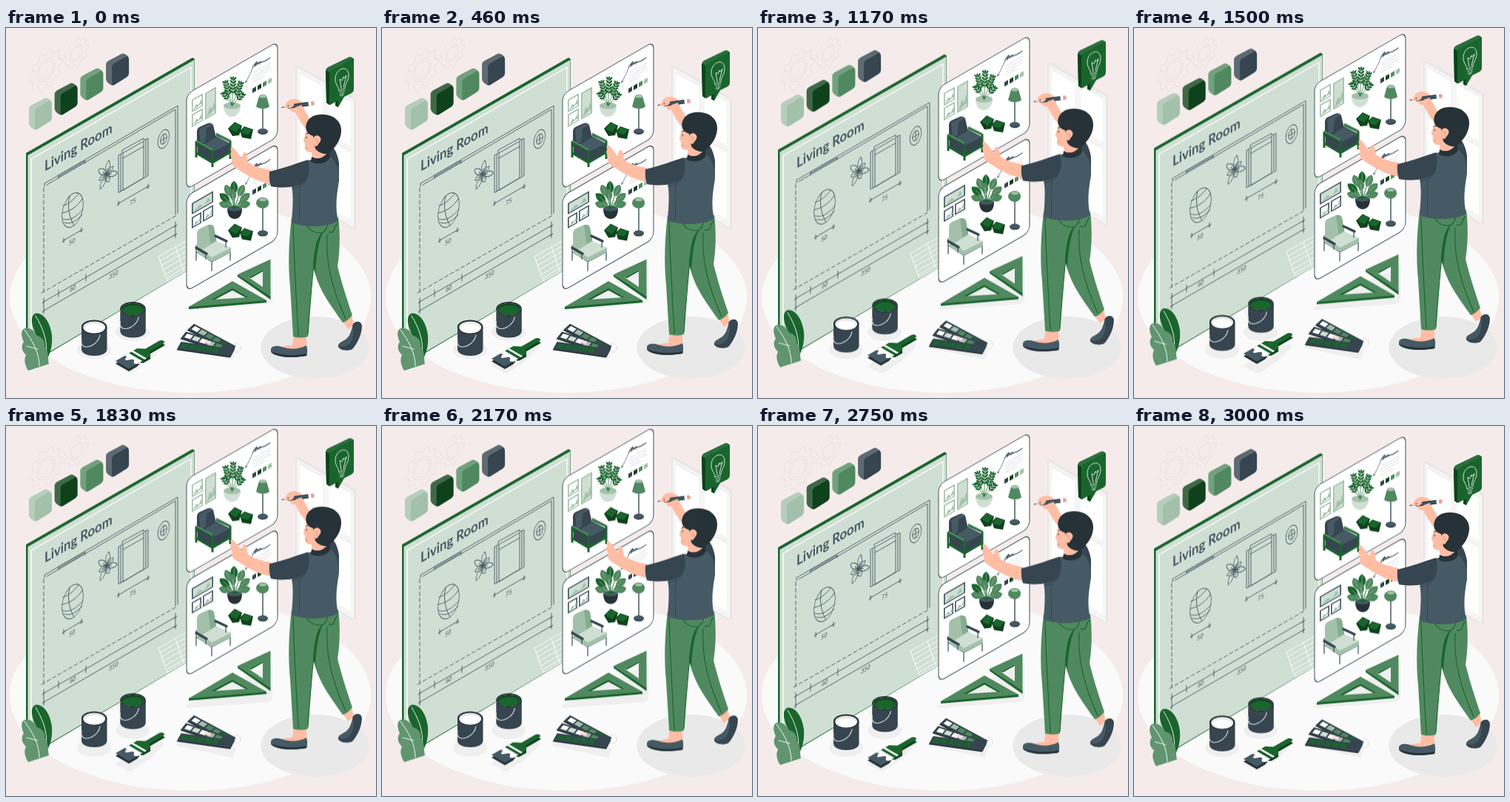
An HTML page that plays this animation: 500x500 px, repeating every 3040 ms.

```html
<!DOCTYPE html>
<html lang="en">
<head>
<meta charset="utf-8">
<title>Living room design</title>
<style>
html, body { margin: 0; width: 100%; height: 100%; overflow: hidden; background: #f5ebeb; }
svg { display: block; width: 100vw; height: 100vh; stroke-width: .9; }
.bob, .late { --a: -10px; animation: bob 3040ms linear infinite; }
.late { animation-name: late; }
#cards { --a: -19.7px; }
#bubble { --a: -29px; }
@keyframes bob {
  0%, 98.684%, 100% { transform: translateY(0); }
  49.342% { transform: translateY(var(--a)); }
}
/* same 3 s bob, started half a second later and cut by the loop */
@keyframes late {
  0%, 16.447% { transform: translateY(0); }
  65.789% { transform: translateY(var(--a)); }
  100% { transform: translateY(calc(var(--a) * .3067)); }
}
.w { fill: #fff } .s { fill: #455a64 } .k { fill: #36454f } .n { fill: #263238 }
.g { fill: #50895f } .d { fill: #1a652e } .x { fill: #0f421c } .l { fill: #a3c1aa }
.p { fill: #d0dfd4 } .f { fill: #ffbda4 } .sh { fill: #efefef }
.o { fill: none; stroke: #455a64; stroke-linejoin: round; stroke-linecap: round }
.wl { stroke: #fff } .dl { stroke: #1a652e }
text { fill: #455a64; font-family: Lato, Arial, sans-serif }
</style>
</head>
<body>
<svg viewBox="0 0 500 500">
  <ellipse cx="249" cy="364" rx="244" ry="129" fill="#fafafa"/>
  <g id="gears" fill="none" stroke="#e9dfdf"></g>
  <ellipse cx="417.5" cy="432" rx="73" ry="42" fill="#e9e9e9"/>
  <g class="sh">
    <ellipse cx="119" cy="435" rx="23" ry="12"/>
    <ellipse cx="171" cy="411" rx="23" ry="12"/>
    <path d="M147 457L176 438 211 426 214 430 194 450 168 467Z"/>
    <path d="M241 379L306 346 360 369 354 373 246 381Z"/>
    <path d="M314 342L360 322V369Z"/>
    <path d="M230 432L250 407 311 436 306 448Z"/>
  </g>

  <g class="late">
    <path d="M391 52L394 50 473 95V271L470 272 391 226Z" fill="#e8e6e6"/>
    <path d="M393 53L470 97V270L393 225Z" fill="#f5f5f5"/>
    <path class="w" d="M397 60L428 78V137L397 119ZM436 82L466 99V159L436 142ZM397 127L428 145V237L397 219ZM436 150L466 167V259L436 242Z"/>
    <path d="M397 60L428 78M436 82L466 99M397 127L428 145M436 150L466 167" stroke="#e4e4e4" fill="none"/>
  </g>

  <g id="board" class="late">
    <path class="d" d="M27 169L252 40 255 42V322L30 456 27 454Z"/>
    <path class="p" d="M29.500 172L254.500 43V322L29.500 455Z"/>
    <path class="o wl" stroke-width="1.300" d="M34 449V177L250 53V322"/>
    <text transform="matrix(.866 -.5 0 1 52 194)" font-size="19.300" font-weight="700">Living Room</text>
    <path class="o" d="M52 214V210L232 105V250M55 212L229 110V252M71 203V199L107 179V183M71 201L107 181"/>
    <path class="o" stroke-dasharray="5 3.500" d="M51 216V357M48 358L229 254"/>
    <path class="o" d="M51 370L229 267M51 382L229 279M51 365V386M71 354V363M108 333V342M229 262V283M49 372l4-3M49 384l4-3M227 269l4-3M227 281l4-3"/>
    <g class="o">
      <path d="M152 222V172L157 169V165L186 149V152L192 149V199ZM158 219V169L186 153V202ZM158 176L186 160M155 221V171M189 200V151M152 237L192 214M152 234V240M192 211V217M78 287L102 273M78 284V290M102 270V276M150 239l4-3M190 216l4-3M76 289l4-3M100 275l4-3"/>
      <ellipse transform="matrix(.866 -.5 0 1 90 246)" rx="16.500" ry="22"/>
      <path d="M77 240C86 238 93 230 98 224M76 250C88 248 97 240 103 231M77 258C86 262 96 254 104 245M79 263C87 266 95 261 103 252M86 227C82 240 86 258 92 267"/>
      <ellipse transform="matrix(.866 -.5 0 1 213 150)" rx="9" ry="12"/>
      <ellipse transform="matrix(.866 -.5 0 1 213 150)" rx="5" ry="6.500"/>
      <path d="M213 144V156M208.500 152.500L217.500 147.500"/>
      <g id="sketch" transform="matrix(.866 -.5 0 1 136 198)"></g>
    </g>
    <g font-size="8.500" font-style="italic">
      <text transform="matrix(.866 -.5 0 1 86 357)">60</text>
      <text transform="matrix(.866 -.5 0 1 139 340)">350</text>
      <text transform="matrix(.866 -.5 0 1 167 240)">75</text>
      <text transform="matrix(.866 -.5 0 1 85 294)">50</text>
    </g>
    <path class="o wl" d="M206 309L243 288M206 309L218 342 243 328M208 315L243 295M210 321L243 302M212 327L243 309M215 333L243 317M217 338L243 323M229 296L240 328"/>
    <g id="cubes"></g>
    <path class="d" d="M48 451C52 435 45 425 39 411C34 400 33 389 39 386C50 383 60 398 62 415C63 430 60 440 54 450Z"/>
    <path class="o wl" d="M40 389C51 407 57 425 54 446"/>
    <path fill="#609570" d="M30 463C25 455 24 448 27 442C21 436 20 430 24 424C20 416 20 408 25 406C34 404 38 410 42 416C50 418 53 424 52 430C58 436 56 445 58 454Z"/>
    <path class="o wl" d="M25 408C37 424 45 440 45 457M28 430L43 434"/>
  </g>

  <g class="late">
    <g id="can">
      <path class="k" d="M102 404V434C102 446 136.500 446 136.500 434V404Z"/>
      <ellipse class="n" cx="119.200" cy="404" rx="17.300" ry="9.500"/>
      <ellipse cx="119.200" cy="404.500" rx="15" ry="8" fill="#e8e8e8"/>
      <ellipse class="w" cx="119.200" cy="406" rx="13" ry="6.200"/>
      <path class="o" style="stroke:#dfe3e4" stroke-width="1.200" d="M102 421C100 431 108 433 116 429C124 425 126 420 127 415"/>
    </g>
    <use href="#can" x="52.300" y="-24.500"/>
    <ellipse class="x" cx="171.500" cy="380" rx="15" ry="8"/>
    <ellipse class="d" cx="171.500" cy="381" rx="13.500" ry="6.500"/>
    <path class="o" style="stroke:#dfe3e4" d="M155 382C149 386 149 393 154 397"/>
  </g>

  <g class="bob">
    <g class="x" transform="matrix(.86 -.5 .86 .5 148 453.500)">
      <path class="n" d="M0 0H18V21H0Z"/><path d="M21 0H34L40 7H64V14H40L34 21H21Z"/>
    </g>
    <g transform="matrix(.86 -.5 .86 .5 148 450)">
      <path class="s" d="M0 0H20V21H0Z"/>
      <path class="w" d="M22 0V21H13Q9 18 14 15T12 9T15 3L14 0Z"/>
      <path class="d" d="M21 0H34L40 7H60Q65 7 65 10.500T60 14H40L34 21H21Z"/>
      <path class="w" d="M25 0H28V21H25Z"/>
    </g>
    <path class="w" d="M178 456L185 452V455L178 459Z"/>
  </g>

  <g id="fan" class="late"><ellipse cx="312" cy="432" rx="5" ry="6" fill="none" stroke="#dedede"/></g>

  <g class="late">
    <path class="d" fill-rule="evenodd" d="M247 377V380L352 371V368L306 344ZM277 370L306 354 327 366Z"/>
    <path class="g" fill-rule="evenodd" d="M247 377L306 342 352 368ZM278 367L306 352 327 364Z"/>
    <path class="d" d="M278 367L306 352 327 364 324 364.300 306 354.500 282 367Z"/>
    <path class="d" d="M313 333L357.500 362V367L313 336Z"/>
    <path class="g" fill-rule="evenodd" d="M313 333L357.500 312.500V363ZM328 337L347 327V350Z"/>
    <path class="d" d="M328 337L347 327V329L331 338Z"/>
  </g>

  <g id="cards" class="late">
    <g id="card">
      <rect class="w" transform="matrix(.866 -.5 0 1 244 89.500)" width="142" height="128.500" rx="9" stroke="#455a64" stroke-width="1.200"/>
      <path class="o" stroke-width="1.100" d="M333 54C336 48 340 43 339 47L336 52C339 49 341 46 341 49C343 48 344 45 345 47C347 47 347 44 349 45C350 46 352 42 353 43L357 40M335 50L345 45"/>
      <path d="M334 61L358 47M334 65L358 51M334 69L358 55M334 73L350 64" stroke="#cfd6d9" fill="none" stroke-width=".8"/>
      <path class="o" stroke-width=".7" d="M333 55C330 62 327 68 324 73M324 71V74L326 72"/>
      <path class="k" d="M333 82l5-3v6l-5 3z"/><path class="x" d="M340 78l5-3v6l-5 3z"/>
      <path class="g" d="M347 74l5-3v6l-5 3z"/><path class="l" d="M354 70l5-3v6l-5 3z"/>
      <path class="x" d="M300 136L309 127 319 132 315 145 306 146Z"/>
      <path class="d" d="M302 136L309 128 318 132 311 141Z"/>
      <path class="x" d="M316 139L322 133 334 137 331 150 319 148Z"/>
      <path class="d" d="M321 134L333 137 327 144 317 142Z"/>
      <path class="o" stroke-width="1.500" d="M347 106V140"/>
      <ellipse class="k" cx="347" cy="140" rx="7" ry="4"/><ellipse class="s" cx="347" cy="139" rx="6.500" ry="3"/>
    </g>
    <use href="#card" y="137.600"/>
    <g id="frames"></g>
    <path class="g" d="M342 92L338 106C341 110 353 110 356 106L352 92Z"/><ellipse class="l" cx="347" cy="92" rx="5" ry="2.500"/>
    <path class="g" d="M338 237C338 232 342 229 347 229S355 232 355 237C354 246 340 246 338 237Z"/><ellipse class="l" cx="347" cy="232" rx="5" ry="2"/>
    <path class="p" d="M294 105C294 114 299 120 305 120S317 114 317 105Z"/><ellipse cx="305.500" cy="105" rx="11.500" ry="4.500" class="l"/>
    <g id="fern"></g>
    <path class="n" d="M299 244C299 253 303 258 309 258S319 253 319 244Z"/><ellipse cx="309" cy="244" rx="10" ry="3.500" class="s"/>
    <g id="ficus"></g>

    <g stroke-linejoin="round">
      <path class="k" d="M258 160V139Q258 136 261 134L272 129Q277 127 280 131L285 153 278 168Z"/>
      <path class="s" d="M261 137L273 130Q277 128 280 131L271 136 269 161 263 158Z"/>
      <path class="k" d="M259 159L284 146 303 156V167L279 181 259 170Z"/>
      <path class="s" d="M267 158L284 147 303 156 279 168Z"/>
      <path d="M284 144L303 153V177M257 175V154L279 166V188M257 169L279 182 303 168" fill="none" stroke="#1a652e" stroke-width="3"/>
      <path d="M284 142.500L303 152M257 152.500L279 164.500" fill="none" stroke="#50895f" stroke-width="2"/>
    </g>
    <g>
      <path class="o" stroke-width="1.300" d="M257 294V314M278 312V328M303 300V314M258 303L278 316 303 303"/>
      <path class="l" d="M258 300V278Q258 273 262 271L273 266Q279 265 281 269L285 291 274 304Z"/>
      <path class="g" opacity=".35" d="M273 266Q279 265 281 269L285 291 277 297Z"/>
      <path class="l" d="M259 301L284 288 304 297V303L278 316 259 305Z"/>
      <path class="p" d="M265 300L284 288 304 297 278 310Z"/>
      <path d="M283 281L298 288M257 297L271 305" fill="none" stroke="#36454f" stroke-width="3.500" stroke-linecap="round"/>
      <path class="o" stroke-width="1.300" d="M297 289V296M270 305V312"/>
    </g>
  </g>

  <g class="bob">
    <path class="f" d="M378 104C380 97 388 94 395 97C400 99 402 103 402 108L412 126 409 141C401 132 395 122 391 114C386 114 383 111 384 108Z"/>
    <path class="f" d="M455 396L467 387 470 401 462 407ZM389 414L406 414 406 432 386 434Z"/>
    <path class="k" d="M469 400C473 395 480 396 481 402C481 415 474 427 468 434C462 437 452 436 449 431C448 426 454 424 459 421C466 416 467 408 469 400Z"/>
    <path class="s" d="M469 400C471 410 470 424 461 429Q453 433 449 429C450 425 455 424 459 421C466 416 467 408 469 400Z"/>
    <path class="f" d="M371 431Q388 426 406 430L400 437 378 437Z"/>
    <path class="s" d="M358 434C359 429 367 429 373 431C384 435 396 434 406 429C408 435 407 440 406 443C390 446 365 446 358 438Z"/>
    <path class="n" d="M358 437C372 443 392 443 407 440L406 443C390 446 364 446 358 437Z"/>
    <path class="g" d="M402 258L449 256C452 280 451 305 448 322C455 350 462 370 468 388Q462 396 455 398C440 376 420 352 415 320Z"/>
    <path class="g" d="M386 256C382 290 381 320 384 350L388 417Q398 420 408 417C411 380 412 345 418 305L430 258Z"/>
    <path class="o dl" d="M428 276C420 284 418 296 416 318C413 350 410 385 408 414M388 264C389 310 392 360 395 416M448 264C441 270 447 277 436 276M405 265C409 273 418 279 429 276C435 270 435 264 434 262M434 280C431 320 444 360 459 393" stroke-width="1.100"/>
    <path class="d" d="M428 276C420 284 417 296 415 322L418 332C419 312 421 292 428 276Z"/>
    <path class="k" d="M434 157C442 158 447 166 450 182V205L434 180Z"/>
    <path class="s" d="M404 180L436 172C446 179 451 191 450 207C446 230 445 244 449 261C434 269 406 271 386 263C387 246 389 230 386 213L400 195Z"/>
    <path class="o" style="stroke:#36454f" d="M398 212C394 230 398 246 396 263M405 207C402 212 394 216 387 217"/>
    <path class="f" d="M358 192C345 190 333 186 327 181C325 175 326 170 323 168C319 167 320 174 318 176C314 170 310 164 306 161C303 161 303 164 305 168C302 168 303 173 306 178C304 182 306 187 312 190C322 197 340 208 358 211Z"/>
    <path class="k" d="M408 178C392 183 374 190 356 194Q355 205 358 214C374 217 395 216 406 206Q412 194 408 178Z"/>
    <path class="f" d="M408 131L402 152Q401 155 404 155L404 163Q405 168 413 168L414 175Q424 179 435 172L434 135Z"/>
    <path class="n" d="M413 174Q425 181 436 167L438 174C436 182 423 186 412 181Z"/>
    <path class="n" d="M415 146C409 144 403 139 406 129C410 119 420 116 430 117C445 118 454 128 453 140C452 153 444 163 435 170C427 171 421 167 418 163Z"/>
    <path class="f" d="M424 147C420 143 414 146 415 153C416 160 420 162 422 157C425 154 427 150 424 147Z"/>
    <path class="o" style="stroke:#d98c74" d="M418 150Q422 149 420 156M404.500 162L408 162" stroke-width=".7"/>
    <path class="o" style="stroke:#263238" d="M405.500 143L409 142M406 147V149"/>
    <g transform="translate(372 107.500) rotate(-7.500)">
      <path class="f" d="M0 0L10-2.700V2.700Z"/><path class="n" d="M0 0L3-.8V.8Z"/>
      <path class="k" d="M9-2.800H38V2.800H9Z"/><path class="s" d="M9-1H38V1H9Z"/>
      <path class="w" d="M37-2.800H40.500V2.800H37Z"/><path d="M40.500-2.800H44Q46.500 0 44 2.800H40.500Z" fill="#e9a196"/>
    </g>
    <path class="f" d="M378 104C381 98 386 96 391 99L388 106Q384 109 381 108L382 104Z"/>
    <path class="f" d="M391 107L400 104 401 112 393 113Z"/>
  </g>

  <g id="bubble" class="bob">
    <path class="d" d="M432 58Q432 55 435 53L463 39.500Q465 38.500 467 39.500L470 41.500V83Q470 86 467 88L457 93 449 107 445 105V100L438 104 433 101Z"/>
    <path class="x" d="M432 57L437 60V104L433 101ZM445 100L449 98V107L445 105Z"/>
    <path class="g" opacity=".3" d="M432 56Q433 54 435 53L463 39.500Q466 38 469 41L439 57 437 60Z"/>
    <path class="o" style="stroke:#e6efe8" d="M450 85C450 79 445 77 445 69C445 61 450 56 455 55C460 54 463 58 463 64C463 72 458 75 458 81ZM451 88L458 84M451 91L457 87.500M453 92L456 90M453 82L451 69 454 71 456 66 457 68 460 64 456 80"/>
  </g>
</svg>
<script>
const put = (id, s) => document.getElementById(id).insertAdjacentHTML('beforeend', s);
const leaf = (x, y, deg, len, w, cls) =>
  `<path class="${cls}" transform="translate(${x} ${y}) rotate(${deg})" d="M0 0C${len * .3} ${-w} ${len * .75} ${-w} ${len} 0C${len * .75} ${w} ${len * .3} ${w} 0 0"/>`;

function gear(cx, cy, r, teeth) {
  let d = '';
  for (let i = 0; i < teeth * 4; i++) {
    const a = (i - .5) / teeth / 4 * 2 * Math.PI, q = i % 4 < 2 ? r : r * .8;
    d += (i ? 'L' : 'M') + (q * Math.cos(a)).toFixed(1) + ' ' + (q * Math.sin(a)).toFixed(1);
  }
  return `<g transform="matrix(.866 -.5 0 1 ${cx} ${cy})"><path d="${d}Z"/><circle r="${r * .55}"/><circle r="${r * .42}"/></g>`;
}
put('gears', gear(54, 57, 26, 10) + gear(95, 34, 19, 9));

['#a3c1aa', '#0f421c', '#50895f', '#36454f'].forEach((c, i) => put('cubes',
  `<g transform="translate(${31 + i * 34.7} ${94.5 - i * 20})" fill="${c}">
  <path d="M0 15Q0 12 3 10L20 1Q23-1 26 1L29 3Q31 5 31 8V27Q31 30 28 32L12 42Q9 44 6 42L2 39Q0 37 0 34Z"/>
  <path d="M0 15Q0 12 3 10L20 1Q23-1 26 1L29 3 10 14Q8 16 8 19V43L2 39Q0 37 0 34Z" fill="#fff" opacity=".2"/></g>`));

for (let i = 0; i < 7; i++)
  put('sketch', leaf(0, 0, i * 51 - 80, i % 2 ? 12 : 18, 4.5, 'o') +
    `<path d="M0 0l${8 * Math.cos(i * .89 - 1.4)} ${8 * Math.sin(i * .89 - 1.4)}"/>`);

// fan of colour strips around one pivot
[[28, 64, 'w l g g d'], [18, 70, 'w p w l g'], [8, 73, 'd d d d d']].forEach(([deg, len, tones]) => {
  let s = `<g transform="translate(306 ${442 - deg * .28}) rotate(${deg}) skewX(-20)">
  <rect class="n" x="${-len}" y="-5" width="${len}" height="11"/><rect class="k" x="${-len}" y="-6" width="${len}" height="10.500"/>`;
  tones.split(' ').forEach((t, i) => s += `<rect class="${t}" x="${3 - len + i * 10.5}" y="-4" width="8.500" height="6"/>`);
  put('fan', s + '</g>');
});
put('fan', '<path d="M269 421l8 2.500-1 4.500-8-2.500z" fill="#f6dcd6"/>');

// wall pictures: x, y, width, height
[[251, 97, 15, 17], [269, 88, 15, 36], [251, 117, 15, 17], [251, 237, 29, 15], [251, 256, 13, 15], [266, 247, 14, 15]].forEach(([x, y, w, h], i) => {
  const t = w * .577;
  put('frames', `<path class="${i < 3 ? 'l' : 's'}" d="M${x} ${y}l${w} ${-t}v${h}l${-w} ${t}z"/>
  <path class="${i == 1 || i == 3 ? 'p' : 'w'}" d="M${x + 1.7} ${y + .8}l${w - 3.4} ${2 - t}v${h - 3.4}l${3.4 - w} ${t - 2}z"/>
  <path class="l" d="M${x + 2} ${y + h - 3}l${w * .3} ${-t * .3 - h * .35} ${w * .2} ${h * .1} ${w * .2} ${-t * .5 - h * .2} ${w * .1} ${h * .3}z"/>`);
});

[[297, 74], [307, 69], [317, 75], [295, 89], [319, 90]].forEach(([tx, ty], k) => {
  const dx = tx - 305.5, dy = ty - 105, a = Math.atan2(dy, dx) * 180 / Math.PI;
  let s = `<path class="o dl" stroke-width=".7" d="M305.500 105L${tx} ${ty}"/>`;
  const pairs = k < 3 ? 5 : 3;
  for (let i = 1; i <= pairs; i++) for (const side of [-42, 42]) {
    const q = .35 + .6 * i / pairs;
    s += leaf(305.5 + dx * q, 105 + dy * q, a + side, 6.5, 1.7, 'd');
  }
  put('fern', s + leaf(tx, ty, a, 4, 1.5, 'd'));
});

[[-165, 19], [-15, 19], [-140, 24], [-40, 25], [-115, 33], [-65, 33], [-92, 37], [-155, 13], [-25, 14], [-100, 20]].forEach(([a, len], i) => {
  const r = a * Math.PI / 180, x = 309 + Math.cos(r) * len * .35, y = 243 + Math.sin(r) * len * .5;
  put('ficus', `<path class="o dl" d="M309 244L${x} ${y}"/>` + leaf(x, y, a, Math.min(len * .8, 18), 6.5, i % 4 == 2 ? 'd' : 'g') +
    `<path class="o" style="stroke:#a3c1aa" stroke-width=".6" d="M${x} ${y}l${Math.cos(r) * len * .45} ${Math.sin(r) * len * .45}"/>`);
});
</script>
</body>
</html>
```
